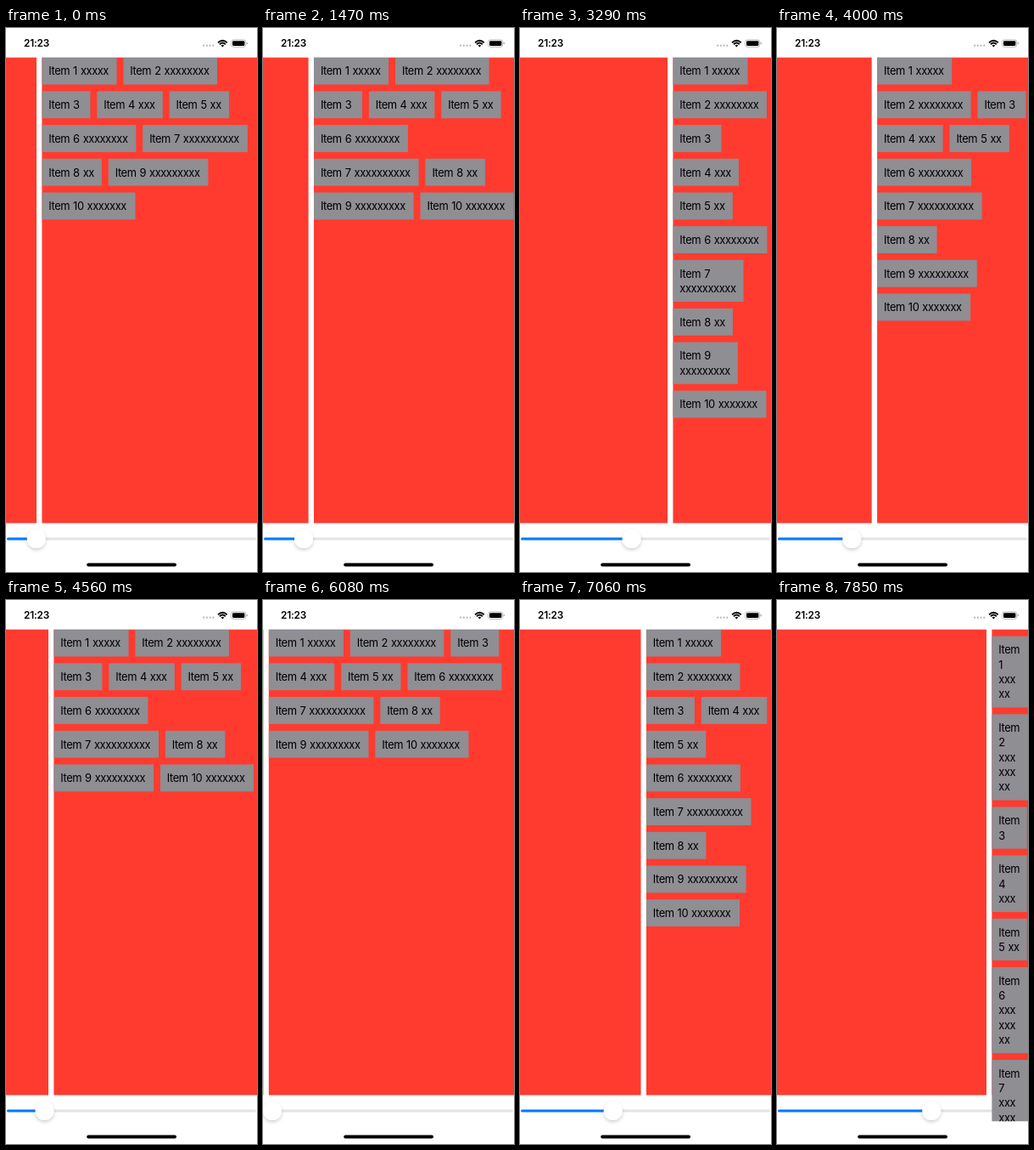
Animation, 296 px wide and 640 px high, one loop 9310 ms. Source, as an HTML page:

```html
<!DOCTYPE html>
<html lang="en">
<head>
<meta charset="utf-8">
<title>Flow layout with resizable panel</title>
<style>
  html, body { margin: 0; width: 100%; height: 100%; overflow: hidden; background: #fff; }
  svg { display: block; width: 296px; height: 640px; }
  text { font-family: Inter, Roboto, sans-serif; }
  .item text { font-size: 12.9px; letter-spacing: -.42px; word-spacing: .75px; }
  .item rect { fill: #8e8e93; }
  .clock { font-size: 11.8px; font-weight: 600; letter-spacing: -.2px; }
</style>
</head>
<body>
<svg viewBox="0 0 296 640">
  <defs>
    <clipPath id="safe"><rect y="34.7" width="296" height="578.5"/></clipPath>
    <filter id="shadow" x="-50%" y="-50%" width="200%" height="200%">
      <feDropShadow dx="0" dy="2" stdDeviation="2" flood-opacity=".2"/>
    </filter>
  </defs>
  <rect width="296" height="640" fill="#fff"/>

  <text class="clock" x="21" y="22.3">21:23</text>
  <g fill="#b5b5b8">
    <circle cx="233.2" cy="20.7" r="1.1"/><circle cx="236.9" cy="20.7" r="1.1"/>
    <circle cx="240.6" cy="20.7" r="1.1"/><circle cx="244.3" cy="20.7" r="1.1"/>
  </g>
  <g fill="none" stroke="#000" stroke-width="1.9">
    <path d="M250.1 17.2Q255.4 12.2 260.7 17.2"/>
    <path d="M252 19.2Q255.4 16 258.8 19.2"/>
  </g>
  <path d="M253.5 20.5Q255.4 19 257.3 20.5L255.4 22.5Z"/>
  <rect x="265.7" y="13.9" width="17" height="8.4" rx="2.5" fill="none" stroke="#a6a6a6" stroke-width=".8"/>
  <rect x="267" y="15.2" width="14.4" height="5.8" rx="1.4"/>
  <path d="M283.7 16.6q1.3 .4 1.3 1.5t-1.3 1.5z" fill="#a6a6a6"/>

  <g fill="#ff3b30">
    <rect id="left" y="34.7" height="547.8"/>
    <rect id="right" y="34.7" height="547.8"/>
  </g>
  <rect x="1" y="599.5" width="294" height="3" rx="1.5" fill="#e4e4e6"/>
  <rect id="fill" x="1" y="599.5" height="3" rx="1.5" fill="#007aff"/>
  <circle id="thumb" cy="601" r="11" fill="#fff" filter="url(#shadow)"/>
  <g id="items" clip-path="url(#safe)"></g>
  <rect x="95.2" y="629.6" width="105.8" height="4" rx="2"/>
</svg>
<script>
const LOOP = 9310, STAGE = 296, TOP = 34.7;
const PAD = 7.9, GAP = 7.9, LINE = 17.35, ROW = 31.8, DIVIDER = 6.4;

const labels = [5, 8, 0, 3, 2, 8, 10, 2, 9, 7].map((n, i) => `Item ${i + 1} ${"x".repeat(n)}`);

// Advance of each character at the label size
const advance = {
  I: 3.5, t: 4.6, e: 7.1, m: 10.4, " ": 3.6, x: 6.73,
  0: 8.5, 1: 5.9, 2: 8.1, 3: 8.4, 4: 8.7, 5: 8.3, 6: 8.5, 7: 7.7, 8: 8.4, 9: 8.5
};
const measure = s => [...s].reduce((sum, c) => sum + advance[c], 0);

// Bursts of dragging: start, end, number of screen updates
const drags = [
  [1130, 2030, 9], [2140, 2730, 6], [3060, 3740, 7], [3880, 4800, 9],
  [4910, 5140, 3], [6080, 6950, 9], [7060, 7850, 8]
];

// Left panel width over time
const keys = [
  [0, 36], [1020, 36], [1130, 38], [2030, 98], [2380, 147.5], [2730, 175.5],
  [3060, 175.2], [3290, 174], [3740, 137], [4570, 50], [4800, 27], [5140, 4],
  [5970, 4], [6080, .4], [6950, 130], [7060, 142.5], [7850, 247], [LOOP, 247]
];

const slope = i => (keys[i + 1][1] - keys[i][1]) / (keys[i + 1][0] - keys[i][0]);

function tangent(i) {
  if (i === 0 || i === keys.length - 1) return 0;
  const a = slope(i - 1), b = slope(i);
  return a * b > 0 ? 2 * a * b / (a + b) : 0;
}

// Monotone cubic through the keys
function panelWidth(t) {
  let i = 0;
  while (i < keys.length - 2 && t >= keys[i + 1][0]) i++;
  const [t0, a] = keys[i], [t1, b] = keys[i + 1];
  const d = t1 - t0, u = (t - t0) / d, v = 1 - u;
  return a * (1 + 2 * u) * v * v + b * u * u * (3 - 2 * u)
    + d * u * v * (v * tangent(i) - u * tangent(i + 1));
}

// Time of the latest screen update
function updateTime(t) {
  let last = 0;
  for (const [start, end, count] of drags) {
    if (t < start) break;
    const step = (end - start) / (count - 1);
    last = start + Math.min(count - 1, Math.floor((t - start) / step + .15)) * step;
  }
  return last;
}

// Greedy word wrap; words wider than the line break between letters
function wrap(label, room) {
  if (measure(label) <= room) return { lines: [label], broken: false };
  const lines = [];
  let line = "", broken = false;
  for (const word of label.trim().split(" ")) {
    const joined = line ? `${line} ${word}` : word;
    if (measure(joined) <= room) { line = joined; continue; }
    if (line) lines.push(line);
    line = "";
    for (const c of word) {
      if (line && measure(line + c) > room) {
        lines.push(line);
        line = "";
        broken = true;
      }
      line += c;
    }
  }
  lines.push(line);
  return { lines, broken };
}

function flow(left) {
  const room = STAGE - left;
  let x = 0, y = TOP, rowHeight = 0;
  return labels.map(label => {
    const { lines, broken } = wrap(label, room - 2 * PAD);
    const width = broken ? room + .01 : Math.max(...lines.map(measure)) + 2 * PAD;
    const height = ROW + (lines.length - 1) * LINE;
    if (x + width > room) {
      x = 0;
      y += rowHeight + GAP;
      rowHeight = 0;
    }
    const box = { x: left + x, y, width, height, lines };
    x += width + GAP;
    rowHeight = Math.max(rowHeight, height);
    return box;
  });
}

function itemMarkup({ x, y, width, height, lines }) {
  const text = lines.map((s, i) =>
    `<text x="${x + PAD}" y="${y + 20.7 + i * LINE}">${s}</text>`).join("");
  return `<g class="item"><rect x="${x}" y="${y}" width="${width}" height="${height}"/>${text}</g>`;
}

const el = id => document.getElementById(id);
const set = (id, name, value) => el(id).setAttribute(name, value);
let shown = -1;

function draw(time) {
  const t = updateTime(time % LOOP);
  if (t === shown) return;
  shown = t;
  const width = panelWidth(t), start = width + DIVIDER, thumb = 10.8 + width * .694;
  set("left", "width", width);
  set("right", "x", start);
  set("right", "width", STAGE - start);
  set("fill", "width", thumb - 1);
  set("thumb", "cx", thumb);
  el("items").innerHTML = flow(start).map(itemMarkup).join("");
}

const begin = performance.now();
function tick() {
  draw(performance.now() - begin);
  requestAnimationFrame(tick);
}
tick();
</script>
</body>
</html>
```
